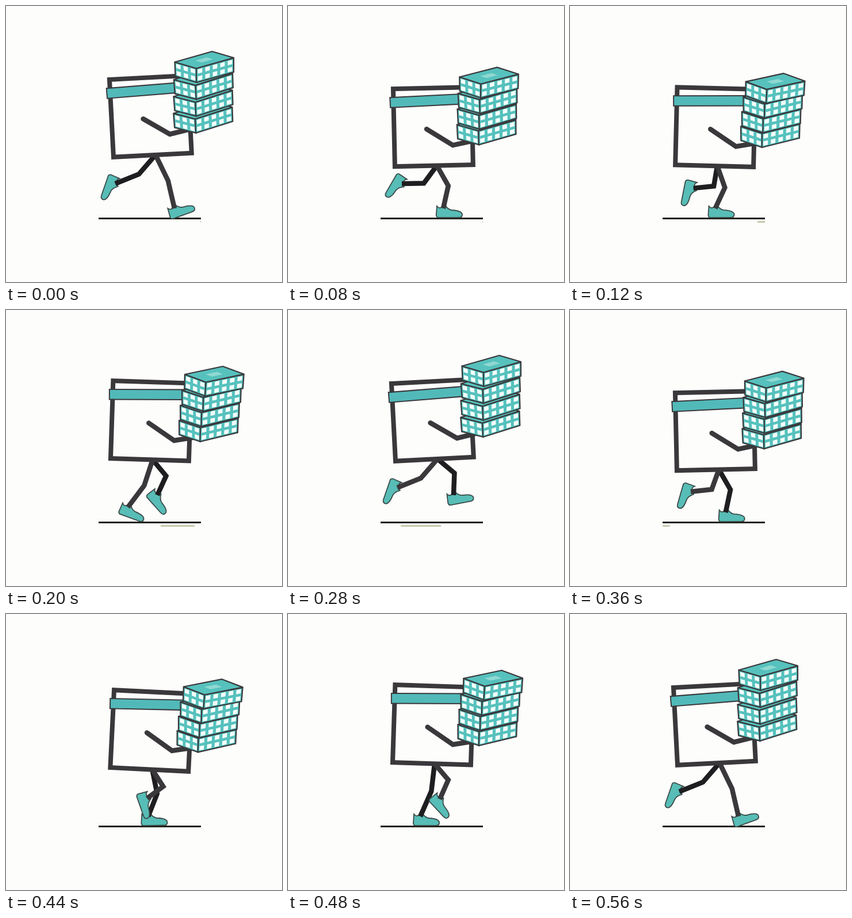
Animation of 480x480 px, one loop 0.6 s. Source, as an HTML page with a canvas:

```html
<!DOCTYPE html>
<html lang="en">
<head>
<meta charset="utf-8">
<title>Running with boxes</title>
<style>
html, body { margin: 0; height: 100%; overflow: hidden; background: #fdfdfc; }
canvas { display: block; }
</style>
</head>
<body>
<canvas id="stage" width="480" height="480"></canvas>
<script>
const ctx = document.getElementById('stage').getContext('2d');
const PAPER = '#fdfdfc', INK = '#3a383b', FAR_INK = '#1e1d1f', TEAL = '#56c1bd';
const LOOP = 600, STEP = 40, STRIDE = 560, GROUND = 369.5;

// Ankle path over one stride: time, x, y, foot angle.
const ANKLE = [
  [0, 293, 352, -20],   // landing
  [80, 270, 352, 0],    // stance
  [166, 230, 352, 0],
  [200, 212, 343, 20],  // push-off
  [280, 190, 309, 109], // kick back
  [326, 198, 309, 120],
  [360, 210, 316, 106],
  [480, 264, 322, 47],  // swing through
  [524, 288, 322, -11]  // reach
];
const SHOE = new Path2D('M-11-4Q-8 0-5-1L3-6Q8 2 15 3Q33 4 33 11Q33 16 27 16H-9Q-13 15-12 9Z');

const rad = deg => deg * Math.PI / 180;

// One bounce per step, two steps per stride.
function bounce(t, mean, s, c) {
  const a = 4 * Math.PI * t / STRIDE;
  return mean + s * Math.sin(a) + c * Math.cos(a);
}

// Smooth closed curve through the ankle path.
function ankleAt(t) {
  t = (t % STRIDE + STRIDE) % STRIDE;
  const n = ANKLE.length;
  const key = i => {
    const [time, ...rest] = ANKLE[(i + n) % n];
    return [time + Math.floor(i / n) * STRIDE, ...rest];
  };
  const i = ANKLE.findLastIndex(k => k[0] <= t);
  const [a, b, c, d] = [-1, 0, 1, 2].map(o => key(i + o));
  const span = c[0] - b[0], s = (t - b[0]) / span, q = 1 - s;
  const [x, y, turn] = [1, 2, 3].map(j => {
    const m0 = (c[j] - a[j]) / (c[0] - a[0]), m1 = (d[j] - b[j]) / (d[0] - b[0]);
    return b[j] * (1 + 2 * s) * q * q + c[j] * s * s * (3 - 2 * s) + span * s * q * (m0 * q - m1 * s);
  });
  return { x, y: Math.min(y, 352), turn };
}

function at(x, y, deg, draw) {
  ctx.save();
  ctx.translate(x, y);
  ctx.rotate(rad(deg));
  draw();
  ctx.restore();
}

function line(points, width, color, cap = 'butt') {
  ctx.beginPath();
  for (const [x, y] of points) ctx.lineTo(x, y);
  ctx.lineWidth = width;
  ctx.strokeStyle = color;
  ctx.lineCap = cap;
  ctx.stroke();
}

function outlinedRect(x, y, w, h, fill, width) {
  ctx.fillStyle = fill;
  ctx.strokeStyle = INK;
  ctx.lineWidth = width;
  ctx.fillRect(x, y, w, h);
  ctx.strokeRect(x, y, w, h);
}

function drawLeg(t, [hx, hy], color) {
  const { x, y, turn } = ankleAt(t);
  at(x, y, turn, () => {
    ctx.fillStyle = '#57bdb6';
    ctx.fill(SHOE);
    ctx.lineWidth = 1.8;
    ctx.strokeStyle = '#3b4a48';
    ctx.stroke(SHOE);
  });
  // The knee bends forward more as the hip and ankle come closer.
  const dx = x - hx, dy = y - hy, reach = Math.hypot(dx, dy);
  const bend = (7 + (95 - reach) * .38) / reach;
  line([[hx, hy], [hx + dx / 2 + dy * bend, hy + dy / 2 - dx * bend], [x, y]], 8.5, color);
}

// Parallelogram from corner o along u and v, with plain squares inside.
function drawFace(o, u, v, cols, rows, size, color) {
  ctx.save();
  ctx.transform(...u, ...v, ...o);
  ctx.fillStyle = TEAL;
  ctx.fillRect(0, 0, 1, 1);
  ctx.fillStyle = color;
  for (let c = 0; c < cols; c++)
    for (let r = 0; r < rows; r++)
      ctx.fillRect((c + (1 - size) / 2) / cols, (r + (1 - size) / 2) / rows, size / cols, size / rows);
  ctx.beginPath();
  ctx.rect(0, 0, 1, 1);
  ctx.restore();
  ctx.lineWidth = 2.2;
  ctx.strokeStyle = INK;
  ctx.lineJoin = 'round';
  ctx.stroke();
}

function drawBox() {
  drawFace([-38.5, -36], [37.5, 11], [1, 24.5], 3, 2, .6, '#f4fdfa');
  drawFace([-1, -25], [65, -18], [0, 24.5], 5, 2, .6, '#f4fdfa');
  drawFace([-38.5, -36], [65, -18.5], [37.5, 11], 1, 1, .3, '#8fd8d2');
}

// A streak that speeds off to the left below the ground line.
function drawDash(t) {
  const edge = (start, k, power) => 339 - k * Math.max(0, t - start) ** power;
  const left = Math.max(161, Math.min(338, edge(90, .15, 1.307)));
  const right = edge(168, .056, 1.52);
  if (right > left) line([[left, 375.5], [right, 375.5]], 3, '#c6cbae');
}

function draw(t) {
  ctx.fillStyle = PAPER;
  ctx.fillRect(0, 0, 480, 480);
  line([[161, GROUND], [339, GROUND]], 3, '#1f1f16');
  drawDash(t);

  const bodyX = bounce(t, 184.5, 2, 2.5);
  const bodyY = bounce(t, 267.5, 10.8, -4.7);
  const tilt = bounce(t, -.3, -1.6, -2.7);
  const hip = [bodyX + 73, bodyY + 73 * Math.sin(rad(tilt))];
  ctx.lineJoin = 'miter';
  // The far leg is half a stride away and lags a little on and off.
  const lag = 36 * Math.sin(3 * Math.PI * t / STRIDE) ** 2;
  drawLeg(t + STRIDE / 2 - lag, hip, FAR_INK);
  drawLeg(t, hip, INK);

  at(bodyX, bodyY, tilt, () => {
    outlinedRect(0, -135, 136, 135, PAPER, 8);
    at(-6, -120, -1.6, () => outlinedRect(0, 0, 140, 17.5, '#52b9b9', 2));
  });

  const stackX = 335.5 - 4.5 * Math.cos(2 * Math.PI * t / STRIDE);
  const stackY = bounce(t, 233.2, 6.4, -11.7);
  const lean = bounce(t, 5, -2.8, -4);
  const height = bounce(t, 81.7, 1.3, 6.3);
  at(stackX, stackY, tilt, () =>
    line([[-91, -30], [-46, -1], [-10, -8]], 8.5, INK, 'round'));
  for (let i = 0; i < 4; i++) {
    const twist = i < 3 ? -2 : 0;
    at(stackX + lean * (i / 3) ** 1.3, stackY - height * i / 3, .8 * (tilt + 3) + twist, drawBox);
  }
}

function tick(now) {
  draw(Math.floor(now % LOOP / STEP) * STEP);
  requestAnimationFrame(tick);
}
requestAnimationFrame(tick);
</script>
</body>
</html>
```
